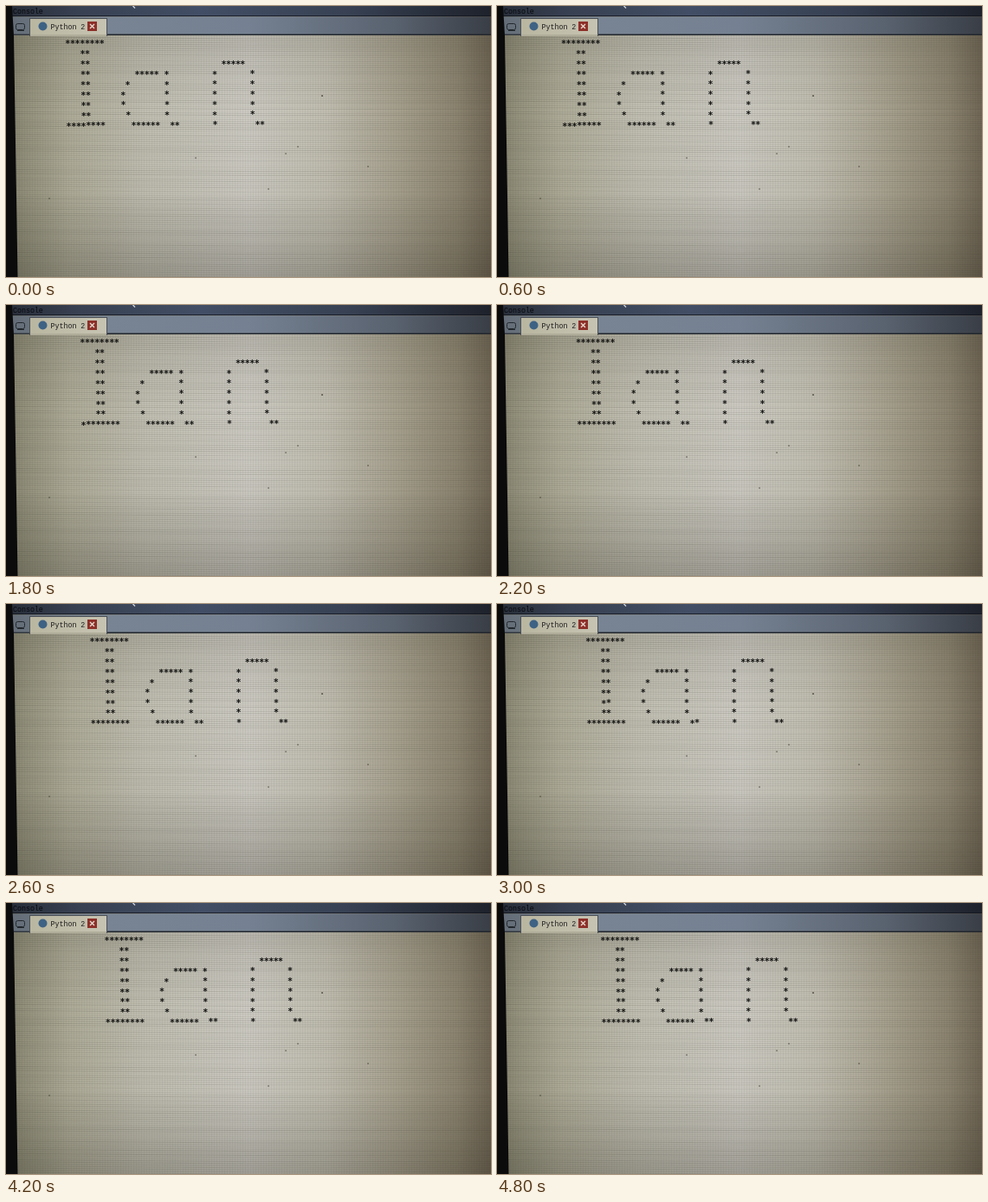
These frames come from a looping animation (560 by 314 pixels, 5000 ms). An HTML page with a canvas:

```html
<!DOCTYPE html>
<html lang="en">
<head>
<meta charset="utf-8">
<title>Console</title>
<style>
html, body { margin: 0; width: 100%; height: 100%; overflow: hidden; background: #0b0b0c; }
canvas { display: block; }
</style>
</head>
<body>
<canvas id="stage" width="560" height="314"></canvas>
<script>
const W = 560, H = 314, LOOP = 5000, TICK = 200, STEP = 500;
const MONO = '"Liberation Mono", "DejaVu Sans Mono", monospace';
const ctx = document.getElementById('stage').getContext('2d');

// Star runs: [first x, row, count]
const runs = [
  [71.3, 0, 8], [72.6, 8, 8],
  [251.5, 2, 5],
  [151.5, 3, 5], [140.5, 4, 1], [135.3, 5, 1], [135.5, 6, 1], [141.3, 7, 1],
  [147.5, 8, 6], [192.3, 8, 2],
  [241.5, 8, 1], [290.5, 8, 2]
];
for (let r = 1; r < 8; r++) runs.push([88.3 + r * 0.2, r, 2]);
for (let r = 3; r < 8; r++) {
  runs.push([185.2 + r * 0.12, r, 1], [241, r, 1], [284.3 + r * 0.08, r, 1]);
}

function gradient(c, coords, stops) {
  const g = c.createLinearGradient(...coords);
  stops.forEach(([at, colour]) => g.addColorStop(at, colour));
  return g;
}

function rect(c, x, y, w, h, fill) {
  c.fillStyle = fill;
  c.fillRect(x, y, w, h);
}

function random(seed) {
  return () => (seed = (seed * 16807) % 2147483647) / 2147483647;
}

function drawPaper(c) {
  rect(c, 0, 0, W, H, gradient(c, [0, 0, W, 0], [
    [0, '#84826d'], [0.04, '#95937e'], [0.13, '#b0ad9a'], [0.29, '#c3c1b4'], [0.5, '#cfcdc5'],
    [0.66, '#c4c1b4'], [0.8, '#aaa492'], [0.93, '#8e8672'], [1, '#716756']
  ]));
  rect(c, 0, 34, W, H, gradient(c, [0, 34, 0, H], [
    [0, 'rgba(25,22,14,0.1)'], [0.3, 'rgba(25,22,14,0)'],
    [0.65, 'rgba(25,22,14,0.02)'], [1, 'rgba(25,22,14,0.24)']
  ]));
  // Scan lines of the display, with a slight tilt
  const rnd = random(41);
  c.lineWidth = 1;
  for (let y = 32; y < H + 4; y += 2.4) {
    c.strokeStyle = `rgba(60,60,50,${0.08 + rnd() * 0.12})`;
    c.beginPath();
    c.moveTo(0, y - 1);
    c.quadraticCurveTo(W / 2, y + 2.5, W, y + 1);
    c.stroke();
  }
  for (let x = 12; x < W; x += 3) rect(c, x, 34, 1, H, 'rgba(60,60,50,0.05)');
}

function drawChrome(c) {
  rect(c, 0, 0, W, 12, gradient(c, [0, 0, W, 0], [
    [0, '#272d38'], [0.15, '#384152'], [0.4, '#424e65'], [0.7, '#384254'], [1, '#1e222b']
  ]));
  rect(c, 0, 11, W, 1.5, 'rgba(18,22,30,0.8)');
  rect(c, 0, 12.5, W, 21, gradient(c, [0, 0, W, 0], [
    [0, '#626b75'], [0.2, '#788493'], [0.5, '#758192'], [0.8, '#59626f'], [1, '#393e46']
  ]));
  rect(c, 116, 32.5, W, 1.5, '#23272d');
  rect(c, 9, 32.5, 18, 1.5, '#32373c');

  rect(c, 27, 14, 89, 20, gradient(c, [27, 0, 116, 0], [[0, '#b9b6a0'], [1, '#c6c3b2']]));
  c.strokeStyle = '#4b5157';
  c.lineWidth = 1;
  c.strokeRect(27.5, 14.5, 89, 20);
  rect(c, 28, 33, 88, 2, '#b0ad9a');

  // Window icon
  c.strokeStyle = '#23282d';
  c.beginPath();
  c.roundRect(11.5, 20.5, 10, 7, 2);
  c.moveTo(13, 28.5);
  c.lineTo(21, 28.5);
  c.stroke();

  c.fillStyle = '#3e6284';
  c.beginPath();
  c.arc(42.5, 23.5, 5, 0, Math.PI * 2);
  c.fill();

  rect(c, 94, 18, 11, 11, '#8d2f29');
  c.strokeStyle = '#e6d9cd';
  c.lineWidth = 1.4;
  c.beginPath();
  c.moveTo(97, 21); c.lineTo(102, 26);
  c.moveTo(102, 21); c.lineTo(97, 26);
  c.stroke();

  c.font = '8.3px ' + MONO;
  c.fillStyle = '#07090d';
  c.fillText('Console', 8, 9);
  c.fillStyle = '#1c1c1d';
  c.fillText('Python 2', 51.5, 26.5);
  c.strokeStyle = '#d5dae0';
  c.lineWidth = 1.2;
  c.beginPath();
  c.moveTo(146.5, 0); c.lineTo(149, 2.5);
  c.stroke();
}

function drawBezel(c) {
  c.fillStyle = '#0b0b0c';
  c.beginPath();
  c.moveTo(0, 0); c.lineTo(7, 0); c.lineTo(9, 34);
  c.lineTo(13.5, H); c.lineTo(0, H);
  c.fill();
}

function drawSpecks(c) {
  const specks = [[365, 104], [50, 223], [219, 176], [337, 163], [303, 212], [418, 186], [323, 171]];
  specks.forEach(([x, y], i) => rect(c, x - 0.7, y - 0.7, 1.5, 1.5, i ? 'rgba(50,46,38,0.6)' : '#35322b'));
}

const scene = document.createElement('canvas');
scene.width = W;
scene.height = H;
const back = scene.getContext('2d');
[drawPaper, drawChrome, drawSpecks, drawBezel].forEach(draw => draw(back));

const pitch = x => 5.72 - x * 0.001;

function drawStars(step) {
  ctx.font = 'bold 10px "DejaVu Sans Mono", monospace';
  ctx.textAlign = 'center';
  ctx.fillStyle = '#0f0f0e';
  const box = ctx.measureText('*');
  const rise = (box.actualBoundingBoxAscent - box.actualBoundingBoxDescent) / 2;
  for (const [x, row, count] of runs) {
    for (let i = 0; i < count; i++) {
      const px = x + (i + step) * pitch(x);
      const tilt = (px - 90) * 0.0009 * row;
      ctx.fillText('*', px, 41.8 + row * 11.9 - tilt + rise);
    }
  }
}

function frame(now) {
  const t = Math.floor((now % LOOP) / TICK) * TICK;
  ctx.drawImage(scene, 0, 0);
  drawStars(Math.floor(t / STEP));
  requestAnimationFrame(frame);
}
requestAnimationFrame(frame);
</script>
</body>
</html>
```
